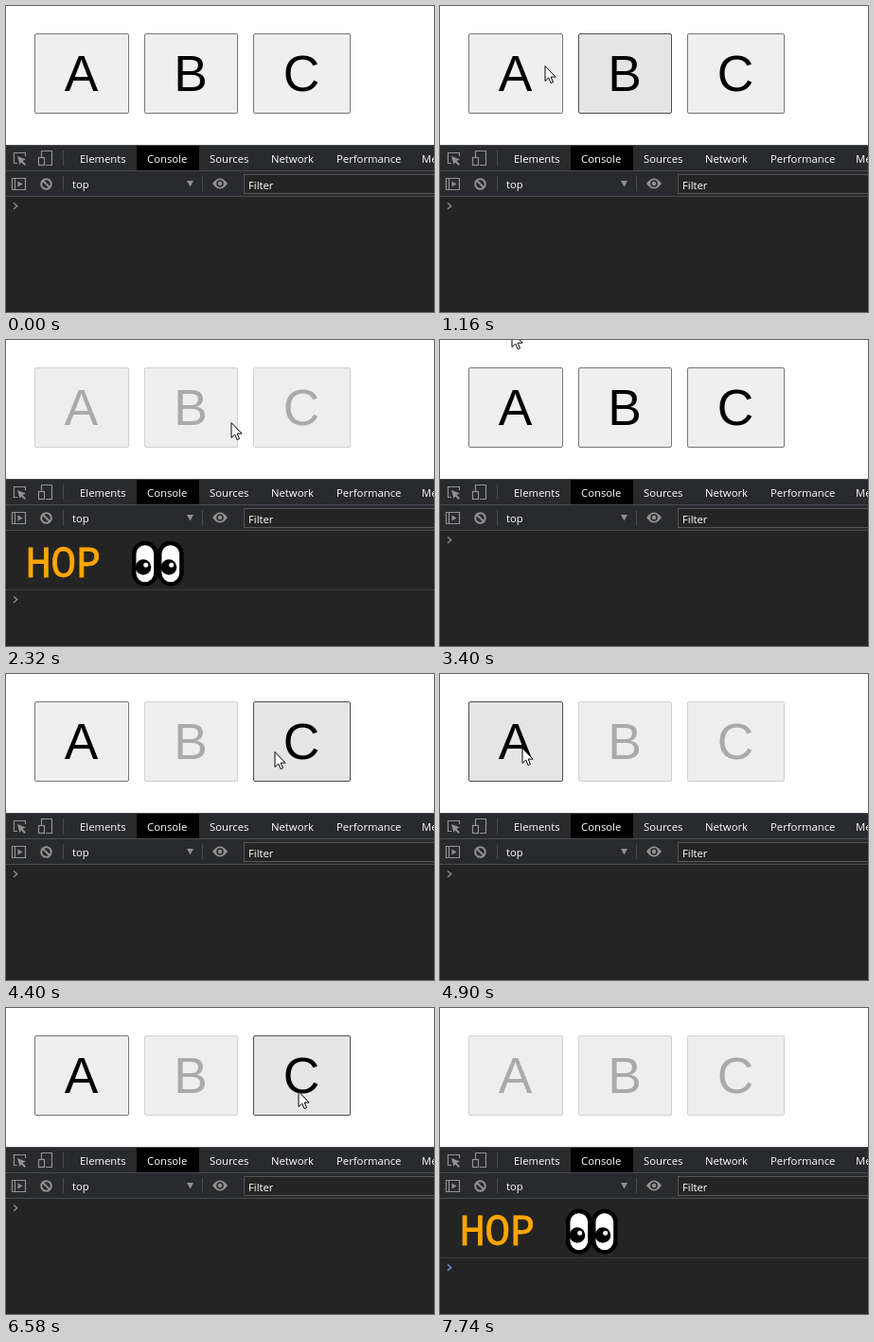
Recreate the animation shown at these times as an HTML page. Size 452 by 324 pixels, loop 8170 ms.

```html
<!DOCTYPE html>
<html lang="en">
<head>
<meta charset="utf-8">
<title>Buttons and console</title>
<style>
  html, body { margin: 0; width: 100%; height: 100%; overflow: hidden; background: #fff; }
  svg { display: block; width: 452px; height: 324px; overflow: hidden; }
  .button rect { fill: #efefef; stroke: #767676; }
  .button text { font: 53.33px "Liberation Sans", Arial, sans-serif; text-anchor: middle; }
  .button.hover rect { fill: #e5e5e5; stroke: #4f4f4f; }
  .button.disabled rect { fill: #eee; stroke: #d0d0d0; }
  .button.disabled text { fill: #aaa; }
  .label { font: 11.3px "Open Sans", "Noto Sans", sans-serif; fill: #fff; }
  .icon { fill: none; stroke: #919191; stroke-width: 1.2; }
  .solid { fill: #919191; }
  .hop { font: 44px "Noto Sans Mono", monospace; fill: #ffa500; stroke: #ffa500; stroke-width: .8; }
</style>
</head>
<body>
<svg viewBox="0 0 452 324">
  <g id="buttons"></g>

  <rect y="147" width="452" height="177" fill="#242424"/>
  <rect y="148" width="452" height="54" fill="#292a2d"/>
  <path d="M0 147.5H452M0 174.5H452M0 201.5H452" stroke="#494c50"/>
  <rect x="138" y="148" width="66" height="26"/>
  <path d="M60.5 153V169M60.5 180V196M207.5 180V196" stroke="#47494d"/>
  <g class="label">
    <text x="78" y="166">Elements</text>
    <text x="149" y="166">Console</text>
    <text x="215" y="166">Sources</text>
    <text x="280" y="166">Network</text>
    <text x="349" y="166">Performance</text>
    <text x="439" y="166">Memory</text>
    <text x="70" y="193">top</text>
  </g>
  <g class="icon">
    <path d="M12 166.5H8.5V155.5H20.5V159"/>
    <path d="M37.5 160V153.5H48.5V168.5H42"/>
    <rect x="34.5" y="160.5" width="6" height="8"/>
    <path d="M6.5 182.5H20.5V194.5H6.5ZM9.5 182.5V194.5"/>
    <g stroke-width="2"><circle cx="42.5" cy="188.5" r="5.3"/><path d="M38.7 184.7L46.3 192.3"/></g>
  </g>
  <g class="solid">
    <path d="M12 159L21 162.5L17.5 164L21 167.5L19.5 169L16 165.5L14.5 168Z"/>
    <path d="M12.5 185.5L17.5 188.5L12.5 191.5Z"/>
    <path d="M191 185H198L194.5 191.5Z"/>
    <path d="M218 188Q226 177 234 188Q226 199 218 188Z"/>
  </g>
  <circle cx="226" cy="188" r="3" fill="#919191" stroke="#292a2d" stroke-width="1.6"/>
  <rect x="251.5" y="178.5" width="210" height="20" fill="#242424" stroke="#555"/>
  <text class="label" x="256" y="194">Filter</text>

  <g id="output">
    <text class="hop" x="21" y="250.5">HOP</text>
    <g id="eye">
      <rect x="135.2" y="215" width="23.2" height="43.4" rx="11.6" fill="#fff" stroke="#000" stroke-width="4.5"/>
      <circle cx="145" cy="240.5" r="8.3"/>
      <circle cx="147.7" cy="238.3" r="2.5" fill="#fff"/>
    </g>
    <use href="#eye" x="27"/>
    <path d="M0 264.5H452" stroke="#3d3d3d"/>
  </g>
  <path id="prompt" d="M8 208.5L11.8 211.7L8 215" fill="none" stroke-width="1.4"/>

  <path id="cursor" d="M1 .5V16.5L4.7 13L7.1 18.6L9.5 17.6L7.1 12.1H12.1Z" fill="#fff" stroke="#000"/>
</svg>

<script>
const LOOP = 8170, REST = 200, HOVER_LAG = 60, ENABLE_DELAY = 45;
const TOP = 29, HEIGHT = 85;
const byId = id => document.getElementById(id);

const buttons = [
  { name: "A", x: 30, width: 100 },
  { name: "B", x: 146, width: 99 },
  { name: "C", x: 261, width: 103 }
];

// The pointer leaves each stop at the given time, clicking the named button.
const stop = (time, x, y, clicked) => ({ time, x, y, clicked });
const rounds = [
  { reload: 3260, stops: [
    stop(330, 329, 326), stop(1070, 196, 63), stop(1404, 82, 63, "A"),
    stop(1780, 196, 84, "B"), stop(2125, 280, 107, "C"), stop(2880, 25, -13)] },
  { reload: 5610, stops: [
    stop(3290, 60, -20), stop(4020, 190, 78, "B"), stop(4530, 283, 82, "C"),
    stop(4960, 86, 78, "A"), stop(5380, 45, -20)] },
  { reload: LOOP, stops: [
    stop(5610, 105, 3), stop(6330, 196, 80, "B"), stop(6780, 308, 88, "C"),
    stop(7400, 82, 80, "A"), stop(7740, 300, 268)] }
];

const smooth = u => u * u * (3 - 2 * u);

function pointer(time) {
  for (const { stops } of rounds) {
    const next = stops.findIndex(s => s.time > time);
    if (next < 1) continue;
    const from = stops[next - 1], to = stops[next];
    const arrival = to === stops.at(-1) ? to.time : to.time - REST;
    const k = smooth(Math.min(1, (time - from.time) / (arrival - from.time)));
    return { x: from.x + (to.x - from.x) * k, y: from.y + (to.y - from.y) * k };
  }
  return { x: -50, y: -50 };
}

const hasClicked = (round, name, time) =>
  round.stops.some(s => s.clicked === name && time >= s.time);

byId("buttons").innerHTML = buttons.map(({ name, x, width }) => `
  <g class="button">
    <rect x="${x + .5}" y="${TOP + .5}" width="${width - 1}" height="${HEIGHT - 1}" rx="1.5"/>
    <text x="${x + width / 2 - .5}" y="89.5">${name}</text>
  </g>`).join("");
const nodes = [...document.querySelectorAll(".button")];

function draw(now) {
  const time = now % LOOP;
  const tip = pointer(time), hover = pointer(time - HOVER_LAG);

  buttons.forEach(({ name, x, width }, i) => {
    const inside = hover.x >= x && hover.x < x + width && hover.y >= TOP && hover.y < TOP + HEIGHT;
    const disabled = rounds.some(round =>
      hasClicked(round, name, time) && time < round.reload + ENABLE_DELAY);
    nodes[i].setAttribute("class", "button " + (disabled ? "disabled" : inside ? "hover" : ""));
  });

  const done = rounds.some(round =>
    time < round.reload && buttons.every(({ name }) => hasClicked(round, name, time)));
  byId("output").style.display = done ? "" : "none";
  byId("prompt").setAttribute("transform", `translate(0 ${done ? 63 : 0})`);
  byId("prompt").setAttribute("stroke", time >= 7730 ? "#7090dc" : "#8c8c8c");
  byId("cursor").setAttribute("transform", `translate(${Math.round(tip.x)} ${Math.round(tip.y)})`);
  requestAnimationFrame(draw);
}
draw(0);
</script>
</body>
</html>
```
